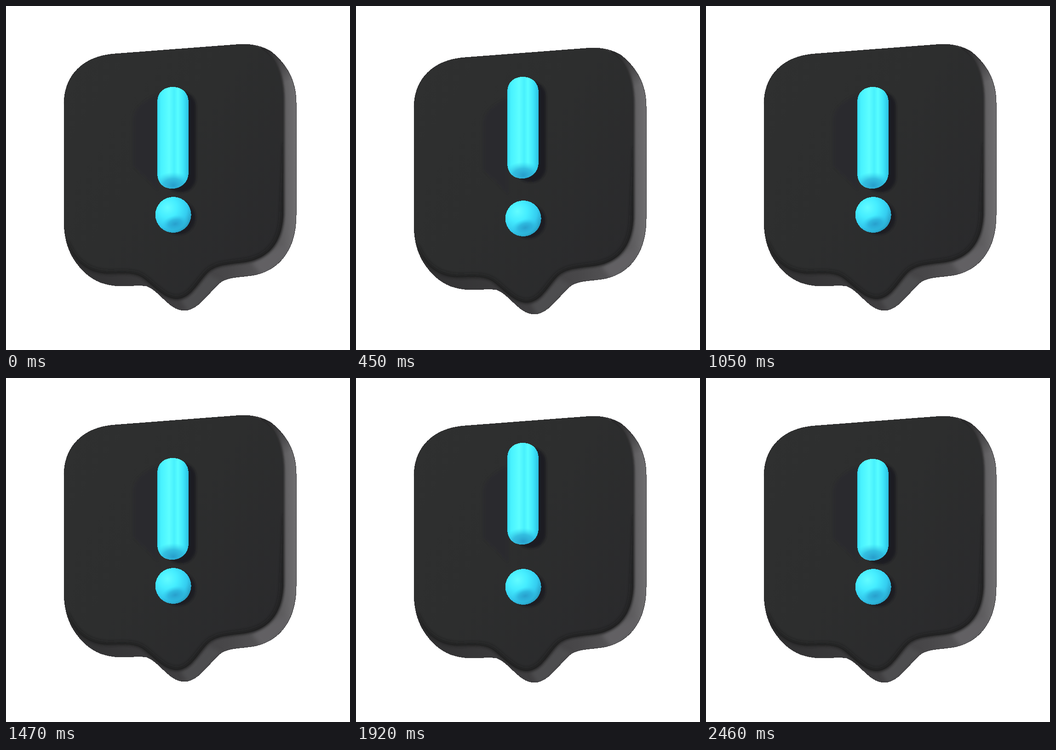
Animation of 748x748 px, one loop 2880 ms. Source, as an HTML page:

```html
<!DOCTYPE html>
<html lang="en">
<head>
<meta charset="utf-8">
<title>Alert bubble</title>
<style>
  html, body { margin: 0; width: 100%; height: 100%; overflow: hidden; background: #fff; }
  svg { display: block; width: 100vw; height: 100vh; }
</style>
</head>
<body>
<svg viewBox="0 0 748 748">
  <defs>
    <path id="outline" d="M126 215C126 150 168 109 237 104L500 84C530 81 554 86 575 98C607 123 631 158 631 210V455C631 522 601 570 545 584C520 590 490 587 469 599C445 616 420 662 388 662C355 662 335 620 306 609C292 606 270 609 250 609C216 608 193 599 172 580C140 550 126 515 126 465Z"/>
    <path id="face" d="M126 215C126 150 168 109 237 104L500 84C568 78 603 126 603 205V445C603 510 575 548 520 557C485 562 458 562 439 579C418 599 402 637 371 637C342 637 317 604 296 590C276 578 250 582 222 582C160 581 126 530 126 465Z"/>
    <clipPath id="inOutline"><use href="#outline"/></clipPath>
    <clipPath id="inFace"><use href="#face"/></clipPath>
    <clipPath id="inBar"><use href="#barShape"/></clipPath>
    <linearGradient id="side" gradientUnits="userSpaceOnUse" x1="160" y1="0" x2="631" y2="0">
      <stop offset="0" stop-color="#313132"/>
      <stop offset=".4" stop-color="#3d3c3e"/>
      <stop offset=".7" stop-color="#49484a"/>
      <stop offset=".93" stop-color="#5c5b5d"/>
      <stop offset="1" stop-color="#6f6e70"/>
    </linearGradient>
    <linearGradient id="sideTop" gradientUnits="userSpaceOnUse" x1="570" y1="90" x2="612" y2="165">
      <stop offset="0" stop-color="#2c2c2d"/>
      <stop offset="1" stop-color="#2c2c2d" stop-opacity="0"/>
    </linearGradient>
    <linearGradient id="faceFill" x1="0" y1="0" x2="1" y2=".8">
      <stop offset="0" stop-color="#2f3030"/>
      <stop offset=".5" stop-color="#2d2e2e"/>
      <stop offset="1" stop-color="#2a2a2c"/>
    </linearGradient>
    <linearGradient id="barFill">
      <stop offset="0" stop-color="#36d8f0"/>
      <stop offset=".12" stop-color="#48f2ff"/>
      <stop offset=".38" stop-color="#5cfeff"/>
      <stop offset=".54" stop-color="#48f0fd"/>
      <stop offset=".66" stop-color="#57fdff"/>
      <stop offset=".82" stop-color="#40e8fb"/>
      <stop offset="1" stop-color="#2cc2e2"/>
    </linearGradient>
    <linearGradient id="barTop" x1="0" y1="0" x2="0" y2="1">
      <stop offset="0" stop-color="#33d0ee"/>
      <stop offset=".13" stop-color="#33d0ee" stop-opacity="0"/>
    </linearGradient>
    <radialGradient id="shade">
      <stop offset="0" stop-color="#289fcc"/>
      <stop offset=".5" stop-color="#2bb0d9" stop-opacity=".8"/>
      <stop offset="1" stop-color="#33ccee" stop-opacity="0"/>
    </radialGradient>
    <radialGradient id="dotFill" cx=".34" cy=".3" r=".78">
      <stop offset="0" stop-color="#62fcff"/>
      <stop offset=".35" stop-color="#45edff"/>
      <stop offset=".7" stop-color="#34cdf0"/>
      <stop offset="1" stop-color="#2390b6"/>
    </radialGradient>
    <filter id="soft" x="-20%" y="-20%" width="140%" height="140%"><feGaussianBlur stdDeviation="2"/></filter>
    <filter id="softer" x="-30%" y="-30%" width="160%" height="160%"><feGaussianBlur stdDeviation="4"/></filter>
  </defs>

  <g id="bubble">
    <use href="#outline" fill="url(#side)" stroke="#3a393b" shape-rendering="crispEdges"/>
    <g clip-path="url(#inOutline)">
      <path d="M550 80H640V180H590Z" fill="url(#sideTop)"/>
      <path d="M380 640C400 634 420 605 440 585L468 598C440 620 425 655 396 664Z" fill="#4e4d4f" filter="url(#softer)"/>
      <path d="M535 560L600 520L618 535L560 588Z" fill="#626163" filter="url(#softer)"/>
      <use href="#face" fill="none" stroke="#252526" stroke-width="5" filter="url(#soft)"/>
    </g>
    <use href="#face" fill="url(#faceFill)"/>
    <g clip-path="url(#inFace)">
      <path d="M610 300L603 445C603 510 575 548 520 557C485 562 458 562 439 579C418 599 402 637 371 637C342 637 317 604 296 590C276 578 250 582 222 582C180 581 150 560 130 515" fill="none" stroke="#1a1b1b" stroke-width="9" filter="url(#softer)"/>
      <path d="M278 240Q282 212 330 192V400L278 350Z" fill="#2b2c2d" filter="url(#soft)"/>
      <g fill="#1d1e20" filter="url(#soft)">
        <rect id="barShade" x="346" y="186" width="67" height="219" rx="32"/>
        <circle id="dotShade" cx="375" cy="460" r="37"/>
      </g>
    </g>
    <g id="bar">
      <path id="barShape" d="M329 209C329 188 343 176 363 176S397 189 397 209V362C397 384 380 397 361 397S329 385 329 364Z" fill="url(#barFill)" shape-rendering="crispEdges"/>
      <use href="#barShape" fill="url(#barTop)"/>
      <ellipse cx="364" cy="390" rx="44" ry="29" fill="url(#shade)" clip-path="url(#inBar)"/>
    </g>
    <g id="dot">
      <circle cx="363.7" cy="454" r="39" fill="url(#dotFill)" shape-rendering="crispEdges"/>
      <ellipse cx="368" cy="474" rx="31" ry="19" fill="url(#shade)" transform="rotate(-14 368 474)"/>
    </g>
  </g>
</svg>
<script>
  const CYCLE = 1440, STEP = 30;
  const el = id => document.getElementById(id);
  const ease = x => (1 - Math.cos(Math.PI * x)) / 2;
  const shift = (y, ...ids) => ids.forEach(id => el(id).setAttribute("transform", `translate(0 ${Math.round(y)})`));

  // Eased value at time t through [time, value] keys
  function track(t, keys) {
    const i = keys.findIndex(k => k[0] > t);
    if (i === 0) return keys[0][1];
    if (i < 0) return keys[keys.length - 1][1];
    const [t0, a] = keys[i - 1], [t1, b] = keys[i];
    return a + (b - a) * ease((t - t0) / (t1 - t0));
  }

  // Ballistic hop of the bar, highest at 510 ms
  const hop = t => -36 * Math.max(0, 1 - ((t - 510) / 150) ** 2);

  function draw(now) {
    const time = Math.floor(now % (2 * CYCLE) / STEP) * STEP;
    const t = time % CYCLE, second = time >= CYCLE;
    const lead = second ? -4 : -2, end = second ? 1020 : 1050;
    shift(track(t, [[5, 0], [240, -72], [390, 31], [480, 0]]), "bubble");
    shift(hop(t), "bar", "barShade");
    shift(track(t, [[150, 0], [270, lead], [390, 0], [660, 0], [810, -28], [end, 0]]), "dot", "dotShade");
    requestAnimationFrame(() => draw(performance.now() - start));
  }

  const start = performance.now();
  draw(0);
</script>
</body>
</html>
```
